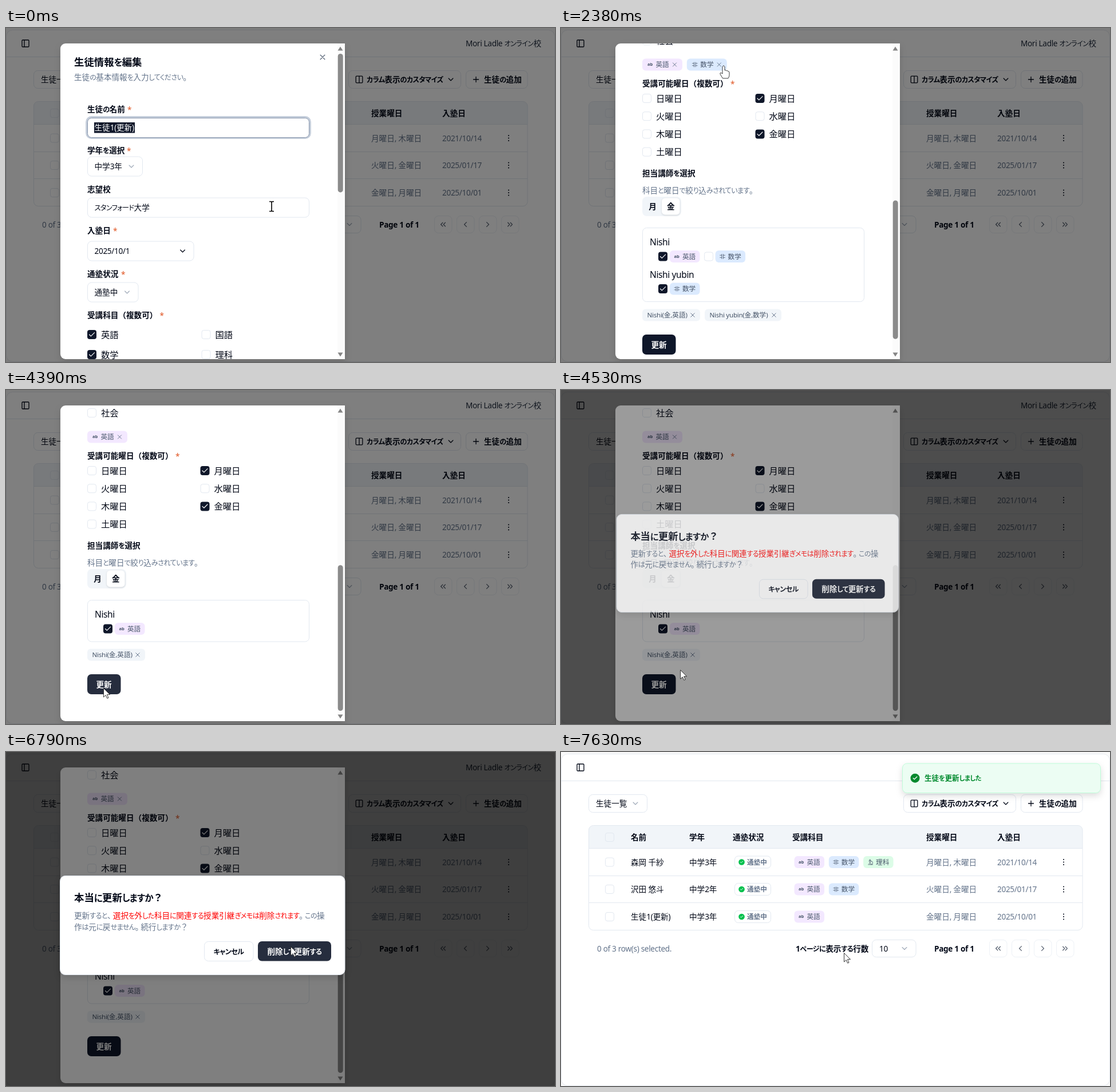
Animation, 959 px wide and 584 px high, one loop 7690 ms. Source, as an HTML page:

```html
<!DOCTYPE html>
<html lang="ja">
<head>
<meta charset="utf-8">
<title>生徒情報を編集</title>
<style>
html, body { margin: 0; width: 100%; height: 100%; overflow: hidden; background: #fff; }
svg { display: block; }
text { font-family: "Noto Sans", "Noto Sans CJK JP", "Noto Sans CJK", sans-serif; white-space: pre; }
.k { font-size: .89em; font-feature-settings: "palt"; letter-spacing: -.045em; }
.p { letter-spacing: -.28em; }
.l { letter-spacing: -.024em; }
.shadow { filter: drop-shadow(0 5px 6px rgba(0, 0, 0, .13)); }
</style>
</head>
<body>
<svg id="stage" width="959" height="584" viewBox="0 0 959 584"></svg>
<script>
const LOOP = 7690;
const INK = '#020817', NAVY = '#0f172a', MUTED = '#64748b', LINE = '#e2e8f0', PALE = '#f1f5f9';
const SM = 13.6, XS = 11.6, MD = 15.3, LG = 17.4;

const PATHS = {
  panel: 'M5 3h14a2 2 0 0 1 2 2v14a2 2 0 0 1-2 2H5a2 2 0 0 1-2-2V5a2 2 0 0 1 2-2zM9 3v18',
  columns: 'M5 3h14a2 2 0 0 1 2 2v14a2 2 0 0 1-2 2H5a2 2 0 0 1-2-2V5a2 2 0 0 1 2-2zM12 3v18',
  down: 'm6 9 6 6 6-6',
  left: 'm15 18-6-6 6-6',
  right: 'm9 18 6-6-6-6',
  first: 'm11 17-5-5 5-5m7 10-5-5 5-5',
  last: 'm6 17 5-5-5-5m7 10 5-5-5-5',
  plus: 'M5 12h14M12 5v14',
  close: 'M18 6 6 18M6 6l12 12',
  check: 'M20 6 9 17l-5-5',
  dots: 'M12 5v.01M12 12v.01M12 19v.01',
  math: 'M9 3v18M15 3v18M2 7h7M2 16h7M15 7h7M15 16h7',
  scope: 'M6 18h8M3 22h18M14 22a7 7 0 1 0 0-14h-1M9 14h2M9 12a2 2 0 0 1-2-2V6h6v4a2 2 0 0 1-2 2ZM12 6V3a1 1 0 0 0-1-1H9a1 1 0 0 0-1 1v3',
  spin: 'M21 12a9 9 0 1 1-6.219-8.56'
};

// Kana are set proportionally, punctuation and Latin tighter.
const runs = s => s.replace(/([ぁ-ヺー]+)|([、。])|[ -~]+/g,
  (m, kana, stop) => `<tspan class="${kana ? 'k' : stop ? 'p' : 'l'}">${m}</tspan>`);
const rich = (x, cy, html, { size = SM, fill = INK, w = 400, at = 'start' } = {}) =>
  `<text x="${x}" y="${cy + size * .37}" font-size="${size}" fill="${fill}" font-weight="${w}" text-anchor="${at}">${html}</text>`;
const text = (x, cy, s, opt) => rich(x, cy, runs(s), opt);
const bold = (x, cy, s, opt) => text(x, cy, s, { w: 600, ...opt });
const muted = (x, cy, s, opt) => text(x, cy, s, { fill: MUTED, ...opt });
const box = (x, y, w, h, rx, fill, more = '') =>
  `<rect x="${x}" y="${y}" width="${w}" height="${h}" rx="${rx}" fill="${fill}" ${more}/>`;
const frame = (x, y, r, b, fill = '#fff', stroke = LINE, rx = 7) =>
  box(x + .5, y + .5, r - x - 1, b - y - 1, rx, fill, `stroke="${stroke}"`);
const icon = (name, cx, cy, size = 15.5, color = INK, sw = 2) =>
  `<path d="${PATHS[name]}" transform="translate(${cx - size / 2} ${cy - size / 2}) scale(${size / 24})" fill="none" stroke="${color}" stroke-width="${sw}" stroke-linecap="round" stroke-linejoin="round"/>`;
const hline = (x, y, r) => `<path d="M${x} ${y + .5}H${r}" stroke="${LINE}"/>`;
const checkbox = (cx, cy, on) => on
  ? box(cx - 8, cy - 8, 16, 16, 4, NAVY) + icon('check', cx, cy, 13.6, '#fff')
  : frame(cx - 8, cy - 8, cx + 8, cy + 8, '#fff', LINE, 3.5);
const select = (x, y, r, s, chev = '#a3adbb') =>
  frame(x, y, r, y + 35) + text(x + 12.5, y + 17.5, s) + icon('down', r - 20, y + 17.5, 15.5, chev);
const label = (cy, s, star) =>
  bold(142, cy, s) + (star ? text(star, cy + 1, '*', { fill: '#e0521f' }) : '');
const panel = (y, b) => `<g class="shadow">${frame(94, y, 592.5, b, '#fff', LINE, 9)}</g>`;

const SUBJECT = {
  英語: ['#f3e8ff'],
  数学: ['#dbeafe', 'math'],
  理科: ['#dcfce7', 'scope']
};
function chip(x, cy, name, closable) {
  const [fill, pic] = SUBJECT[name], pad = closable ? 1.5 : 0;
  return box(x, cy - 10.5, closable ? 70 : 52.5, 21, 6, fill)
    + (pic ? icon(pic, x + 12.5 + pad, cy, 10.5, '#475569', 1.8)
           : text(x + 7.5 + pad, cy - .5, 'ab', { size: 7.6, w: 600, fill: '#475569' }))
    + text(x + 22 + pad, cy, name, { size: XS, w: 500, fill: '#475569' })
    + (closable ? icon('close', x + 56.5, cy, 12.5, MUTED, 1.8) : '');
}
const tag = (x, r, cy, s) => box(x, cy - 10.5, r - x, 21, 6, PALE)
  + text(x + 8.5, cy, s, { size: XS, w: 500, fill: '#475569' }) + icon('close', r - 13, cy, 13, MUTED, 1.8);

function row(cy, name, grade, subjects, days, date) {
  return checkbox(85, cy, false) + text(122, cy, name) + text(224, cy, grade)
    + frame(303, cy - 11, 367, cy + 11, '#fff', LINE, 6)
    + `<circle cx="315.5" cy="${cy}" r="5.3" fill="#00c04d"/>` + icon('check', 315.5, cy, 6.5, '#fff', 3.4)
    + bold(325, cy, '通塾中', { size: XS, fill: MUTED })
    + subjects.map((s, i) => chip(407.5 + i * 60.3, cy, s)).join('')
    + muted(638, cy, days) + muted(762, cy, date) + icon('dots', 878, cy, 15.5, INK, 3.2);
}

const page = () => box(0, 0, 959, 584, 0, '#fafafa') + frame(0, 3, 959, 584, '#fff', '#e5e9ef', 11)
  + hline(0, 50, 959) + icon('panel', 34, 27, 16)
  + text(935, 27, 'Mori Ladle オンライン校', { at: 'end', w: 500, fill: '#1e293b' })
  + frame(48, 74, 151, 106) + text(61, 90, '生徒一覧') + icon('down', 130, 90, 15.5, '#a3adbb')
  + frame(598, 74, 795, 106) + icon('columns', 617, 90) + bold(630, 90, 'カラム表示のカスタマイズ') + icon('down', 777, 90)
  + frame(803, 74, 911.5, 106) + icon('plus', 821, 90) + bold(835, 90, '生徒の追加')
  + `<path d="M48 168V137a8 8 0 0 1 8-8H903a8 8 0 0 1 8 8V168z" fill="${PALE}"/>`
  + frame(48, 128, 911.5, 312, 'none', LINE, 8) + [168, 216, 263].map(y => hline(48, y, 911)).join('')
  + checkbox(85, 149, false).replace('#fff', PALE)
  + [[122, '名前'], [224, '学年'], [300, '通塾状況'], [404, '受講科目'], [638, '授業曜日'], [762, '入塾日']]
    .map(([x, s]) => bold(x, 149, s)).join('')
  + row(192.5, '森岡 千紗', '中学3年', ['英語', '数学', '理科'], '月曜日, 木曜日', '2021/10/14')
  + row(240, '沢田 悠斗', '中学2年', ['英語', '数学'], '火曜日, 金曜日', '2025/01/17')
  + row(288, '生徒1(更新)', '中学3年', ['英語'], '金曜日, 月曜日', '2025/10/01')
  + `<g id="oldChip">${chip(467.8, 288, '数学')}</g>`
  + muted(63, 343.5, '0 of 3 row(s) selected.') + bold(410, 343.5, '1ページに表示する行数')
  + frame(543, 328, 620.5, 359) + text(556, 343.5, '10') + icon('down', 600, 343.5, 15.5, '#a3adbb')
  + bold(652, 343.5, 'Page 1 of 1')
  + ['first', 'left', 'right', 'last'].map((n, i) =>
      frame(748 + i * 39, 328, 779.5 + i * 39, 359, '#fff', '#edf1f6') + icon(n, 763.5 + i * 39, 343.5, 15.5, '#5b6473')).join('');

const heading = (cy, closeX, closeY) => bold(119, cy, '生徒情報を編集', { size: LG })
  + muted(119, cy + 26, '生徒の基本情報を入力してください。') + icon('close', closeX, closeY, 15.5, '#475569');

const DAYS = ['日', '月', '火', '水', '木', '金', '土'];
const fields = () => heading(60, 553, 51)
  + label(142, '生徒の名前', 212)
  + box(140.8, 155.8, 390.4, 36.4, 8.5, '#fff', 'stroke="#c5cedb" stroke-width="3.4"')
  + frame(142, 157, 530, 192, '#fff', '#8594ab')
  + box(154, 165, 71, 18.5, 0, NAVY) + text(154.5, 174, '生徒1(更新)', { fill: '#fff' })
  + label(214, '学年を選択', 211) + select(142, 224.5, 239, '中学3年')
  + label(282, '志望校') + frame(142, 296.5, 530, 331.5) + text(154.5, 314, 'スタンフォード大学')
  + label(354, '入塾日', 187) + select(142, 372.5, 328.5, '2025/10/1', INK)
  + label(430, '通塾状況', 201) + select(142, 444.5, 231.5, '通塾中')
  + label(502, '受講科目（複数可）', 268.5)
  + ['英語', '国語', '数学', '理科', '社会'].map((s, i) => {
      const cx = i % 2 ? 349.5 : 150, cy = 536 + (i >> 1) * 35;
      return checkbox(cx, cy, s === '英語' || s === '数学') + text(cx + 16, cy, s, { size: MD });
    }).join('')
  + chip(142, 648, '英語', true) + `<g class="before">${chip(219.8, 648, '数学', true)}</g>`
  + label(681, '受講可能曜日（複数可）', 296)
  + DAYS.map((d, i) => {
      const cx = i % 2 ? 347.5 : 150, cy = 707 + (i >> 1) * 31.2;
      return checkbox(cx, cy, d === '月' || d === '金') + text(cx + 16, cy, d + '曜日', { size: MD });
    }).join('')
  + label(838, '担当講師を選択') + muted(142, 868, '科目と曜日で絞り込みされています。')
  + box(142, 879, 68, 34, 8, PALE) + box(176, 881.5, 31.5, 29, 6, '#fff', 'style="filter:drop-shadow(0 1px 1.5px rgba(0,0,0,.14))"')
  + bold(160, 896, '月', { at: 'middle' }) + bold(191.7, 896, '金', { at: 'middle' })
  + `<rect id="card" x="142.5" y="933.5" width="387" height="129" rx="7" fill="none" stroke="${LINE}"/>`
  + text(155, 958, 'Nishi', { size: 15.5, w: 500 }) + checkbox(178, 983.5, true) + chip(190, 983.5, '英語')
  + `<g class="before">${checkbox(258, 983.5, false) + chip(269.6, 983.5, '数学')
    + text(155, 1015, 'Nishi yubin', { size: 15.5, w: 500 }) + checkbox(178, 1040, true) + chip(190, 1040, '数学')
    + tag(251, 385, 1086, 'Nishi yubin(金,数学)')}</g>`
  + `<g id="tail">${tag(142, 243, 1086, 'Nishi(金,英語)')}
    <rect id="save" x="142" y="1120" width="58.5" height="35" rx="7" fill="${NAVY}"/>
    ${bold(171, 1137.5, '更新', { fill: '#fff', at: 'middle' })}</g>`;

const SHEET = 'M104 27H592V579H104a9 9 0 0 1-9-9V36a9 9 0 0 1 9-9z';
const form = () => `<path class="shadow" d="${SHEET}" fill="#fff"/>
  <g clip-path="url(#sheet)"><g id="scroll">${fields()}</g>
  ${box(579, 27, 13, 552, 0, '#fbfbfb')}
  <rect id="thumb" x="579.7" width="9" rx="4.5" fill="#8b8b8b"/>
  <path d="M579.5 39.5l4.5-7 4.5 7zM579.5 567.5l4.5 7 4.5-7z" fill="#858585"/></g>`;

const alertBox = () => panel(216, 390)
  + bold(119, 255, '本当に更新しますか？', { size: LG })
  + rich(119, 286, runs('更新すると、') + `<tspan fill="#f00">${runs('選択を外した科目に関連する授業引継ぎメモは削除されます')}</tspan>` + runs('。この操'), { fill: MUTED })
  + muted(119, 305.5, '作は元に戻せません。続行しますか？')
  + frame(346, 331, 432.5, 366) + bold(389, 348.5, 'キャンセル', { at: 'middle' })
  + `<rect id="confirm" x="440" y="331" width="128" height="34.5" rx="7" fill="${NAVY}"/>`
  + bold(504, 348.5, '削除して更新する', { fill: '#fff', at: 'middle' });

const loading = () => panel(186, 420) + heading(220, 568, 211)
  + `<g id="spin">${icon('spin', 343, 322, 31, NAVY)}</g>`
  + text(343.5, 350, '生徒情報を更新中...', { size: 15.5, at: 'middle' });

const toast = () => `<g class="shadow">${frame(596, 19.5, 943, 72, '#ecfdf3', '#bffcd9', 8)}</g>
  <circle cx="618.5" cy="45.7" r="8" fill="#008a2e"/>` + icon('check', 618.5, 45.7, 10, '#fff', 3)
  + bold(635, 45.7, '生徒を更新しました', { size: 12.6, fill: '#008a2e' });

const BEAM = 'M-4-8.5h3l1 1 1-1h3M0-7.5v15M-4 8.5h3l1-1 1 1h3';
const cursors = () => `<g id="cursor">
  <g id="beam" fill="none"><path d="${BEAM}" stroke="#fff" stroke-width="3.4"/><path d="${BEAM}" stroke="#000" stroke-width="1.6"/></g>
  <path id="arrow" d="M.5.5V16l3.6-3.4 2.6 5.6 2.3-1-2.5-5.6H11.5z" fill="#fff" stroke="#222" stroke-width=".9"/>
  <path id="hand" d="M-2 1.8Q0-1.8 2 1.8V8q2.4-1 3 .8q2.4-.8 2.8 1q2-.2 2.2 1.8v5q0 2.5-2 5.4H-1.6L-6 14.5q-.6-2.4 1.6-2.2L-2 14z" fill="#fff" stroke="#222" stroke-width=".9"/></g>`;

const layer = (id, html) => `<g id="${id}">${html}</g>`;
document.getElementById('stage').innerHTML =
  `<clipPath id="sheet"><path d="${SHEET}"/></clipPath>`
  + layer('page', page()) + layer('veil', box(0, 0, 959, 584, 0, '#000'))
  + layer('form', form()) + layer('loading', loading())
  + layer('veil2', box(0, 0, 959, 584, 0, '#000')) + layer('alert', alertBox())
  + layer('toast', toast()) + cursors();

const $ = id => document.getElementById(id);
const set = (id, name, v) => $(id).setAttribute(name, v);
const fade = (id, v) => { set(id, 'opacity', v); set(id, 'display', v > 0 ? 'inline' : 'none'); };
const show = (id, on) => set(id, 'display', on ? 'inline' : 'none');
const ramp = (t, from, ms) => Math.min(1, Math.max(0, (t - from) / ms));
const easeOut = p => 1 - (1 - p) ** 3;

// Smooth curve through [time, value, ...] keys; holds stay flat.
function curve(keys, t, c = 1) {
  let i = 0;
  while (i < keys.length - 2 && t >= keys[i + 1][0]) i++;
  const rate = j => keys[j + 1] && keys[j]
    ? (keys[j + 1][c] - keys[j][c]) / (keys[j + 1][0] - keys[j][0]) : 0;
  const slope = j => {
    const a = rate(j - 1), b = rate(j);
    return a * b > 0 ? 2 * a * b / (a + b) : 0;
  };
  const [a, b] = [keys[i], keys[i + 1]], d = b[0] - a[0], p = ramp(t, a[0], d), q = 1 - p;
  return a[c] * q * q * (1 + 2 * p) + b[c] * p * p * (1 + 2 * q)
    + d * p * q * (slope(i) * q - slope(i + 1) * p);
}

const SCROLL = [[0, 0], [40, 0], [1170, 389], [1640, 584], [2770, 584]];
const POINTER = [
  [0, 464, 312], [40, 464, 312], [1170, 349, 312], [1640, 307, 310], [2380, 284, 66], [3165, 284, 66],
  [3990, 184, 515], [4190, 170, 521], [4400, 170, 521], [4850, 430, 350], [5100, 556, 335],
  [5300, 548, 395], [5400, 500, 412], [5650, 390, 400], [5860, 334, 300], [5960, 352, 274],
  [6150, 430, 290], [6400, 486, 334], [6730, 486, 334], [6790, 497, 340], [6950, 497, 340],
  [7150, 497, 346], [7630, 494, 351], [7690, 494, 351]
];
const REMOVE = 2770, ASK = 4450, CONFIRM = 6950, DONE = 7260;

function zoom(id, cy, v) {
  const s = .95 + .05 * v;
  fade(id, v);
  set(id, 'transform', `translate(343.5 ${cy}) scale(${s}) translate(-343.5 ${-cy})`);
}

function draw(t) {
  const removed = t >= REMOVE, total = removed ? 1118 : 1175;
  const top = removed ? 566 : curve(SCROLL, t);
  const thumb = 516 * 552 / total;
  set('scroll', 'transform', `translate(0 ${-top})`);
  set('thumb', 'height', thumb);
  set('thumb', 'y', 45 + top / (total - 552) * (516 - thumb));
  set('card', 'height', removed ? 72.5 : 129);
  set('tail', 'transform', `translate(0 ${removed ? -57 : 0})`);
  document.querySelectorAll('.before').forEach(g => g.setAttribute('display', removed ? 'none' : 'inline'));

  const x = curve(POINTER, t, 1), y = curve(POINTER, t, 2);
  const over = (l, u, r, b) => x > l && x < r && y > u && y < b;
  set('cursor', 'transform', `translate(${x} ${y})`);
  const kind = t < 140 ? 'beam' : t >= 2300 && t < 2900 ? 'hand' : 'arrow';
  ['beam', 'arrow', 'hand'].forEach(k => show(k, k === kind));
  set('save', 'opacity', t > 3000 && t < ASK + 60 && over(142, 497, 200, 532) ? .9 : 1);
  set('confirm', 'opacity', over(440, 331, 568, 366) ? .9 : 1);

  const asked = easeOut(ramp(t, ASK, 200)) * (1 - easeOut(ramp(t, CONFIRM, 190)));
  fade('veil2', asked * .5);
  zoom('alert', 303.5, asked);

  const closing = easeOut(ramp(t, DONE, 200));
  show('form', t < CONFIRM);
  fade('veil', .5 * (1 - closing));
  zoom('loading', 303.5, t < CONFIRM ? 0 : 1 - closing);
  set('spin', 'transform', `rotate(${(t - CONFIRM) * .36} 343 322)`);
  show('oldChip', t < DONE);

  const drop = easeOut(ramp(t, DONE - 30, 400));
  fade('toast', drop);
  set('toast', 'transform', `translate(0 ${-72 * (1 - drop)})`);
}

let start;
function tick(now) {
  start ??= now;
  draw((now - start) % LOOP);
  requestAnimationFrame(tick);
}
draw(0);
requestAnimationFrame(tick);
</script>
</body>
</html>
```
